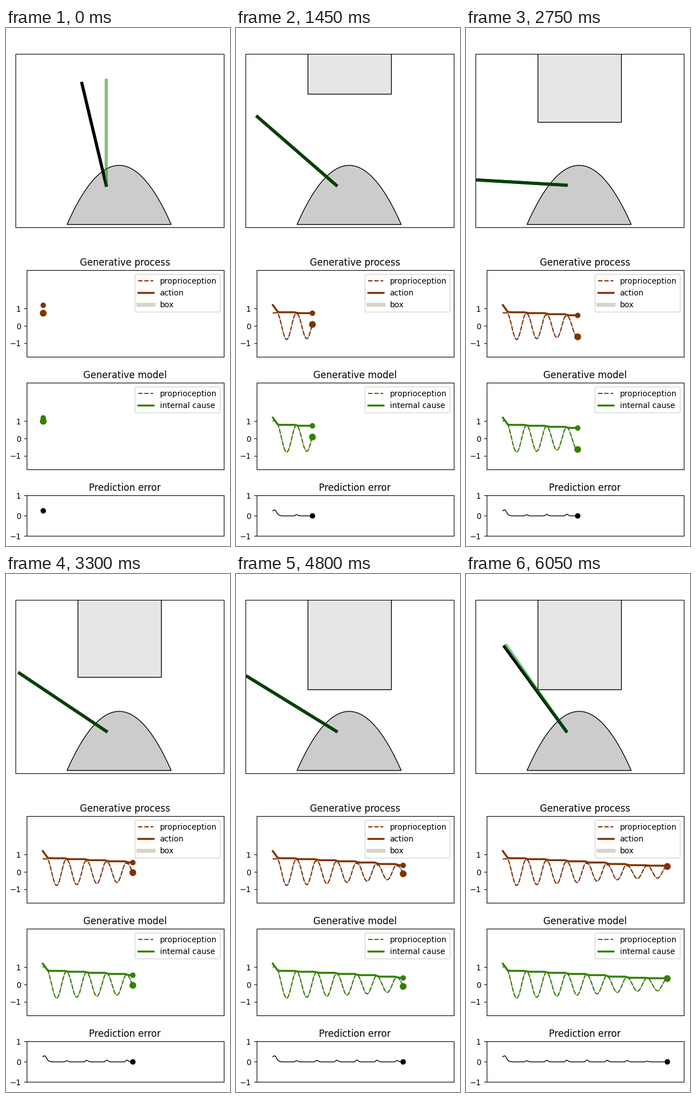
Write a matplotlib script that moves like this. It is 400x920 px and loops after 6100 ms.

```python
import numpy as np
import matplotlib.pyplot as plt
from matplotlib.animation import FuncAnimation
from matplotlib.patches import Polygon, Rectangle

W, H, DPI = 400, 920, 100
FRAMES, SUB = 122, 4
BROWN, GREEN = (0.5, 0.2, 0), (0.2, 0.5, 0)

plt.rcParams["font.family"] = "DejaVu Sans"
# The small margin keeps the pixel size from being rounded down
fig = plt.figure(figsize=((W + 0.01) / DPI, (H + 0.01) / DPI), dpi=DPI,
                 facecolor="white")

# Signals, along a horizontal axis measured in stage pixels
X0, X1 = 65.8, 358.8
PERIOD, PEAK = 35.93, 72.45
x = np.linspace(X0, X1, (FRAMES - 1) * SUB + 1)

peaks = PEAK + PERIOD * np.arange(1, 9)
levels = [0.785, 0.735, 0.675, 0.61, 0.54, 0.455, 0.387, 0.36, 0.352]
bumps = [0.06, 0.08, 0.085, 0.09, 0.085, 0.07, 0.035, 0.025]

knots, values = [X0, 74, 76.5, 80], [1.2, 0.83, 0.79, levels[0]]
for c, before, after in zip(peaks, levels, levels[1:]):
    knots += [c - 4, c, c + 4]
    values += [before, before * 0.4 + after * 0.6, after]
cause = np.interp(x, knots, values)

error = np.interp(x, [X0, 68, 69.7, 71, 73, 75, 78, 82],
                  [0.25, 0.295, 0.3, 0.25, 0.15, 0.075, 0.02, 0])
for c, h in zip(peaks, bumps):
    error += h * np.interp(x - c, [-4.2, -1.5, 0.3, 3, 6], [0, 0.85, 1, 0.35, 0])

swing = np.minimum(cause, levels[0]) * np.cos(2 * np.pi * (x - PEAK) / PERIOD)
start = x < 85
sensed = np.where(start, np.where(x < PEAK, 0.75, np.minimum(0.75, swing)),
                  swing - error)
predicted = sensed + error


def add_axes(left, top, right, bottom):
    return fig.add_axes([left / W, 1 - bottom / H,
                         (right - left) / W, (bottom - top) / H])


def add_panel(top, bottom, ylim, ticks, title):
    ax = add_axes(36.5, top, 388.5, bottom)
    ax.set(xlim=(36.5, 388.5), ylim=ylim, xticks=[], yticks=ticks)
    ax.set_title(title)
    return ax


def add_dot(ax, color, size):
    return ax.plot([], [], "o", color=color, ms=size, mew=0, zorder=4)[0]


def add_traces(ax, color, label):
    under, = ax.plot([], [], color="0.55", lw=1)
    dashed, = ax.plot([], [], "--", color=color, lw=1.5, label="proprioception")
    thick, = ax.plot([], [], color=color, lw=2.5, label=label)
    return under, dashed, thick


# Scene, in stage pixels
scene = add_axes(16.5, 46.5, 388.5, 354.5)
scene.set(xlim=(16.5, 388.5), ylim=(354.5, 46.5), xticks=[], yticks=[])
u = np.linspace(-1, 1, 80)
scene.add_patch(Polygon(np.c_[202 + 93 * u, 349 - 105 * (1 - u**2)],
                        fc="0.8", ec="black", lw=1))
box = scene.add_patch(Rectangle((127.5, -200), 149, 0, fc="0.9", ec="black", lw=1))
PIVOT, ROD = np.array([178.9, 279.2]), 186
rod, = scene.plot([], [], color="black", lw=4)
ghost, = scene.plot([], [], color="green", alpha=0.5, lw=4)

# Plots
process = add_panel(430.5, 584.5, (-1.8, 3.2), [-1, 0, 1], "Generative process")
process_lines = add_traces(process, BROWN, "action")
process.plot([], [], color="#d5d5c9", lw=5, label="box")
process.legend(loc="upper right")

model = add_panel(630.5, 784.5, (-1.8, 3.2), [-1, 0, 1], "Generative model")
model_lines = add_traces(model, GREEN, "internal cause")
model.legend(loc="upper right")

errors = add_panel(830.5, 902.5, (-1, 1), [-1, 0, 1], "Prediction error")
error_line, = errors.plot([], [], color="black", lw=1)

tracks = [
    (process_lines[:2], add_dot(process, BROWN, 8.7), sensed),
    (process_lines[2:], add_dot(process, BROWN, 7), cause),
    (model_lines[:2], add_dot(model, GREEN, 8.7), predicted),
    (model_lines[2:], add_dot(model, GREEN, 7), cause),
    ([error_line], add_dot(errors, "black", 7), error),
]


def box_bottom(k):
    root = np.interp(k, [0, 13, 29, 44, 66, 98], [13.2, 11.51, 9.41, 7.55, 4.8, 0.5])
    return 205.6 - root**2


def aim(line, value):
    a = 0.3 * np.pi * (1 - value)
    tip = PIVOT - ROD * np.array([np.sin(a), np.cos(a)])
    line.set_data([PIVOT[0], tip[0]], [PIVOT[1], tip[1]])


def draw(k):
    i = k * SUB
    for lines, dot, data in tracks:
        for line in lines:
            line.set_data(x[:i + 1], data[:i + 1])
        dot.set_data([x[i]], [data[i]])
    aim(rod, sensed[i])
    aim(ghost, predicted[i])
    box.set_height(box_bottom(k) + 200)
    return []


anim = FuncAnimation(fig, draw, frames=FRAMES, interval=50,
                     init_func=lambda: draw(0), repeat=True, repeat_delay=0)
plt.show()
```
